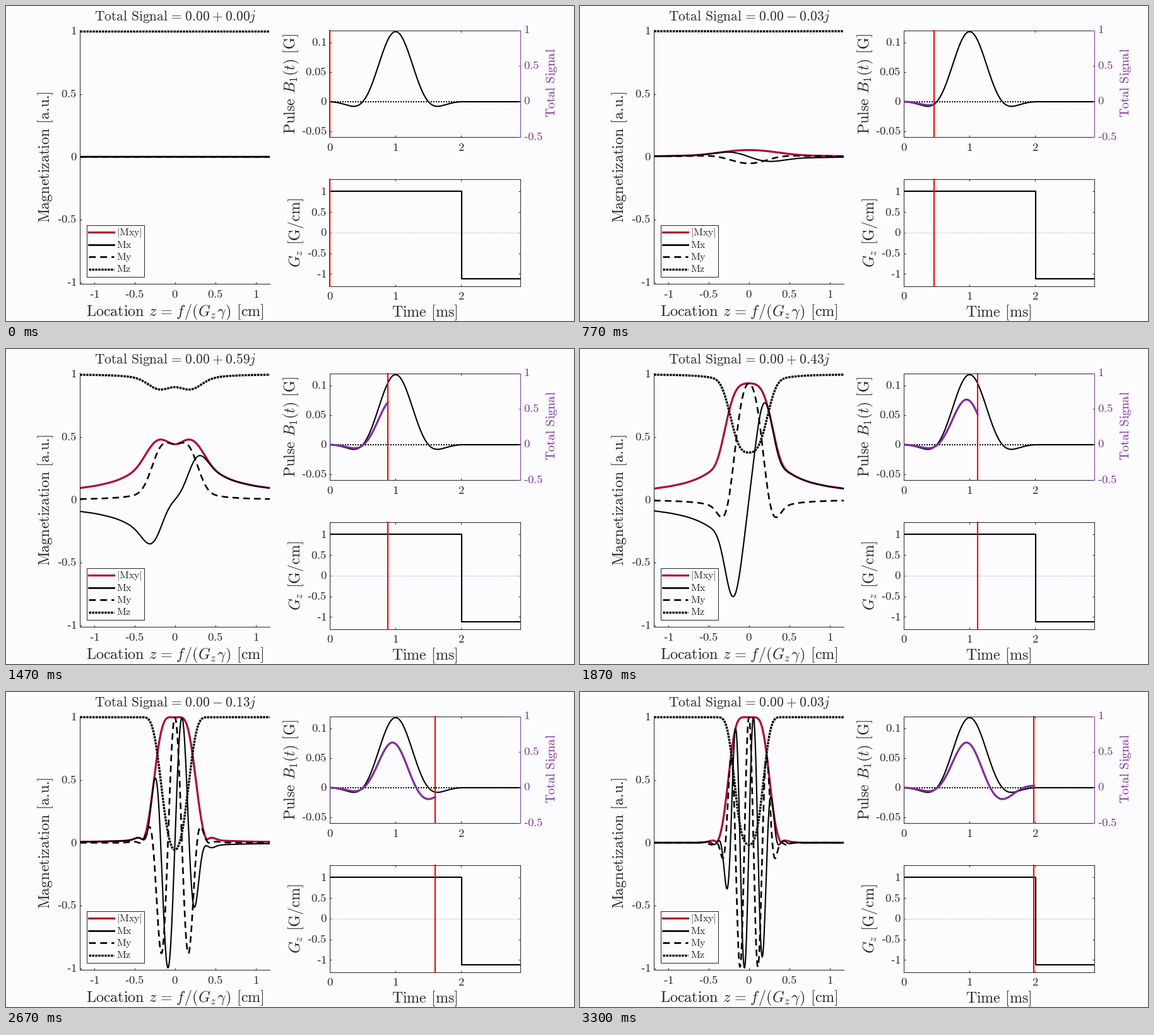
These frames come from a looping animation (900x500 px, 3330 ms). A matplotlib script:

```python
import numpy as np
import matplotlib as mpl
import matplotlib.pyplot as plt
from matplotlib.animation import FuncAnimation
from matplotlib.patches import Rectangle

mpl.rcParams["mathtext.fontset"] = "cm"

W, H, PX = 900, 500, 0.72          # PX: points per pixel at 100 dpi
FRAMES = 100
DT = 0.02                          # ms per frame
GAMMA_KHZ = 4.2577                 # kHz per gauss
GAMMA = 2 * np.pi * GAMMA_KHZ
FLIP = np.radians(91)
Z_MAX = 5 / GAMMA_KHZ
T_MAX = 2.9

BG, INK, BLACK = "#fcfcfe", "#262626", "#000000"
RED, CURSOR, PURPLE, PALE = "#b00834", "#ff0000", "#7e2f9e", "#c8c8ee"


# ---- physics ----
def pulse_shape(t):
    """Hamming-windowed sinc centred at 1 ms, zero after 2 ms."""
    u = t - 1
    return np.where(t <= 2, np.sinc(2 * u) * (0.54 + 0.46 * np.cos(np.pi * u)), 0)


def simulate(z, rf):
    """Bloch rotation with a constant 1 G/cm gradient; state after each step."""
    half = np.exp(-0.5j * GAMMA * z * DT)
    m, mz = np.zeros(z.size, complex), np.ones(z.size)
    rows = []
    for b in rf:
        m = m * half
        c, s = np.cos(GAMMA * b * DT), np.sin(GAMMA * b * DT)
        my = m.imag * c + mz * s
        mz = mz * c - m.imag * s
        m = (m.real + 1j * my) * half
        rows.append((m, mz))
    return rows


times = np.arange(FRAMES) * DT
peak = FLIP / (GAMMA * DT * pulse_shape(times).sum())
z = np.linspace(-Z_MAX, Z_MAX, 401)
states = simulate(z, peak * pulse_shape(times))
signal = np.array([m.mean() for m, _ in states])
signal *= 0.594 / signal[44].imag


# ---- drawing helpers ----
fig = plt.figure(figsize=(W / 100, H / 100), dpi=100, facecolor=BG)

SP = r"\hspace{0.38}"
EQ = r"\hspace{0.116}=\hspace{0.116}"
THIN = r"\hspace{0.07}"


def rm(s):
    return r"\mathrm{" + s + "}"


def write(x, y, s, size, ha="center", color=INK, rotation=0):
    """Math text with its baseline at pixel (x, y)."""
    return fig.text(x / W, 1 - y / H, f"${s}$", fontsize=size * PX, ha=ha,
                    va="baseline", color=color, rotation=rotation,
                    rotation_mode="anchor")


def number(x, y, v, ha, color=INK):
    write(x, y, rm(f"{v:g}".replace("-", "\u2010")), 18.67, ha, color)


def style_ticks(ax, **sides):
    ax.tick_params(direction="in", length=3 * PX, width=PX, color=INK,
                   labelleft=False, labelbottom=False, labelright=False, **sides)


def panel(left, top, right, bottom, xlim, ylim, xticks, yticks, base, box=True):
    ax = fig.add_axes([left / W, 1 - bottom / H, (right - left) / W,
                       (bottom - top) / H], facecolor=BG)
    ax.set_xticks(xticks)
    ax.set_yticks(yticks)
    ax.set_xlim(*xlim)
    ax.set_ylim(*ylim)
    style_ticks(ax, top=box, right=box)
    for name, spine in ax.spines.items():
        spine.set_linewidth(PX)
        spine.set_color(INK)
        spine.set_visible(box or name in ("left", "bottom"))
    for v in xticks:
        px = left + (v - xlim[0]) / (xlim[1] - xlim[0]) * (right - left)
        number(px, base, v, "center")
    for v in yticks:
        py = bottom - (v - ylim[0]) / (ylim[1] - ylim[0]) * (bottom - top)
        number(left - 5, py + 5.5, v, "right")
    return ax


def line(ax, x, y, width, color=BLACK, dash=None, **kw):
    style = (0, dash) if dash else "-"
    return ax.plot(x, y, color=color, lw=width * PX, ls=style,
                   dash_capstyle="butt", **kw)[0]


# ---- magnetization panel ----
ax_m = panel(117.3, 38, 418, 440.5, (-Z_MAX, Z_MAX), (-1.01, 1.01),
             [-1, -0.5, 0, 0.5, 1], [-1, -0.5, 0, 0.5, 1], 463, box=False)
write(267.5, 492, rm("Location") + SP + "z" + EQ + "f" + THIN + "/(G_z" + THIN
      + r"\gamma" + THIN + ")" + SP + rm("[cm]"), 24.1)
write(69.5, 239.5, rm("Magnetization") + SP + r"\text{[a.u.]}", 24, rotation=90)
title = write(268.5, 23, "", 21.4)

STYLES = [("|Mxy|", 3.2, RED, None), ("Mx", 2.1, BLACK, None),
          ("My", 2.6, BLACK, (4, 2.6)), ("Mz", 3.4, BLACK, (1.05, 0.4))]
curves = [line(ax_m, z, 0 * z, w, c, d) for _, w, c, d in STYLES]

legend = fig.add_axes([0, 0, 1, 1], zorder=5)
legend.set_xlim(0, W)
legend.set_ylim(H, 0)
legend.axis("off")
legend.add_patch(Rectangle((128.3, 348.3), 91, 82, fc=BG, ec=INK, lw=PX))
for i, (name, w, c, d) in enumerate(STYLES):
    y = 359.3 + 19.4 * i
    line(legend, [131, 171], [y, y], max(w, 2.7), c, d)
    legend.text(175, y + 5, f"${rm(name)}$", fontsize=16 * PX, color=INK,
                va="baseline")

# ---- pulse panel ----
ax_p = panel(513.3, 39, 815, 208.4, (0, T_MAX), (-0.06, 0.12), [0, 1, 2],
             [-0.05, 0, 0.05, 0.1], 229.5)
ax_p.tick_params(right=False)
write(458.5, 123, rm("Pulse") + SP + "B_1(t)" + SP + rm("[G]"), 24, rotation=90)
t = np.linspace(0, T_MAX, 600)
line(ax_p, [0, T_MAX], [0, 0], 2, dash=(1, 1))
line(ax_p, t, peak * pulse_shape(t), 2.1)

ax_s = ax_p.twinx()
ax_s.set_yticks([-0.5, 0, 0.5, 1])
ax_s.set_ylim(-0.5, 1)
style_ticks(ax_s)
ax_s.tick_params(color=PURPLE)
for name, spine in ax_s.spines.items():
    spine.set_visible(name == "right")
    spine.set_color(PURPLE)
    spine.set_linewidth(PX)
for v in (-0.5, 0, 0.5, 1):
    number(819.5, 156.3 - 113.3 * v, v, "left", PURPLE)
write(870.5, 121.5, rm("Total") + SP + rm("Signal"), 20.2, color=PURPLE,
      rotation=90)
trail = line(ax_s, [], [], 3.2, PURPLE)

# ---- gradient panel ----
ax_g = panel(513.3, 274.6, 815, 445, (0, T_MAX), (-1.3, 1.3), [0, 1, 2],
             [-1, -0.5, 0, 0.5, 1], 466.5)
write(466, 359.5, "G_z" + SP + rm("[G/cm]"), 24, rotation=90)
write(663.5, 493.3, rm("Time") + SP + rm("[ms]"), 24)
line(ax_g, [0, T_MAX], [0, 0], 1.4, PALE, (1, 0.8))
line(ax_g, [0, 2.004, 2.004, T_MAX], [1, 1, -1 / 0.9, -1 / 0.9], 2.1)

cursors = [ax.axvline(0, color=CURSOR, lw=2.1 * PX, zorder=6, clip_on=False)
           for ax in (ax_s, ax_g)]


def update(k):
    m, mz = states[k]
    for curve, y in zip(curves, (abs(m), m.real, m.imag, mz)):
        curve.set_ydata(y)
    trail.set_data(times[:k + 1], signal[:k + 1].imag)
    for c in cursors:
        c.set_xdata([times[k]] * 2)
    im = round(signal[k].imag, 4) + 0.0
    gap = r"\hspace{0.05}"
    op = gap + ("-" if im < 0 else "+") + gap
    title.set_text("$" + rm("Total") + SP + rm("Signal") + EQ + "0.00" + op
                   + f"{abs(im):.2f}j$")
    return [*curves, trail, *cursors, title]


update(0)
anim = FuncAnimation(fig, update, frames=FRAMES, interval=33.3, repeat=True,
                     repeat_delay=0)
plt.show()
```
